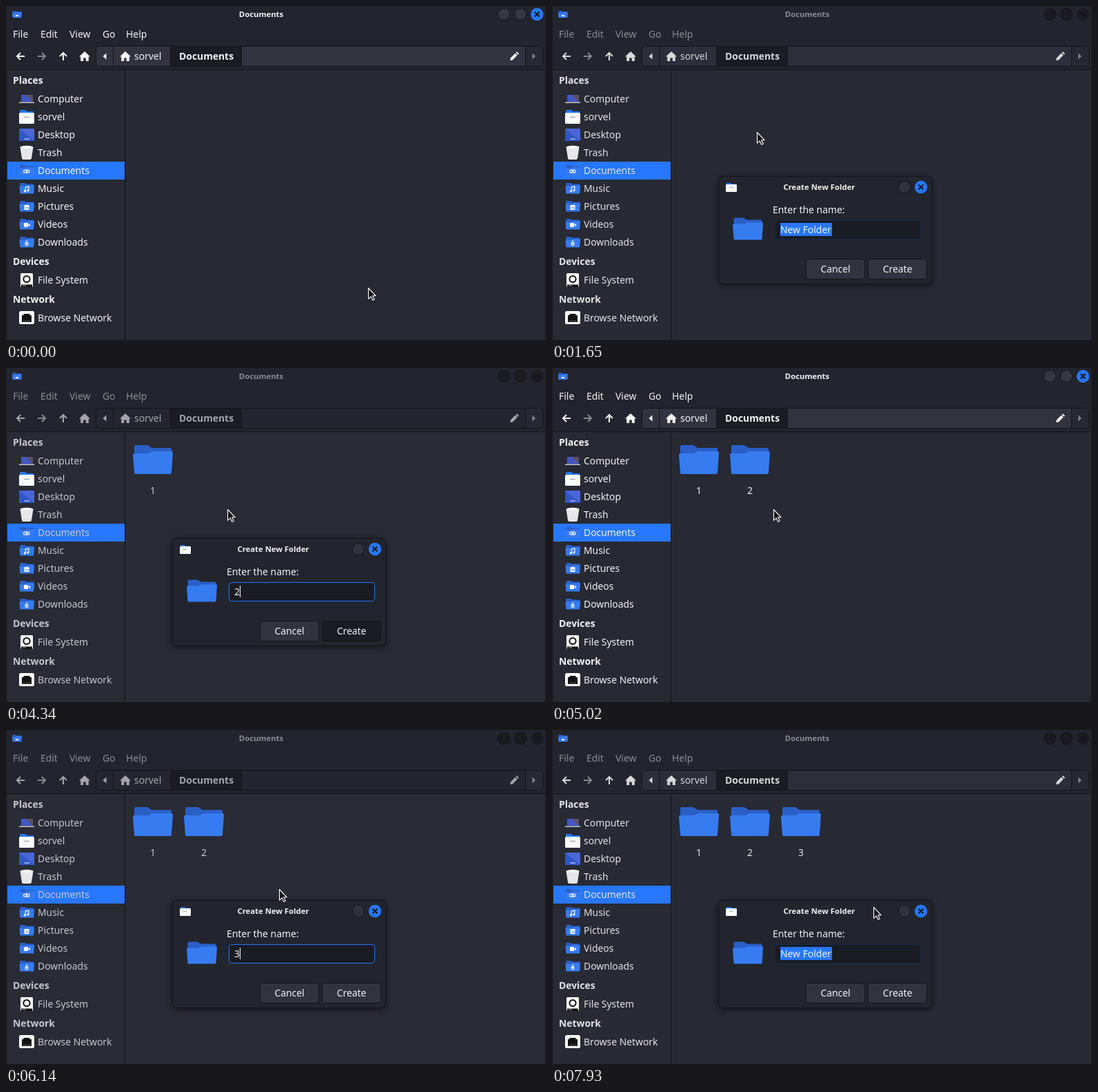
These frames come from a looping animation (783 px wide and 485 px high, 7990 ms). An HTML page:

```html
<!DOCTYPE html>
<html lang="en">
<meta charset="utf-8">
<title>Documents</title>
<style>
html, body { margin: 0; width: 100%; height: 100%; overflow: hidden; background: #23252e; }
svg {
  display: block; --k: 0; --off: 0;
  --view: color-mix(in srgb, #272933, #292b35 calc(var(--k) * 100%));
  --text: color-mix(in srgb, #f4f4f5, #c6c7cb calc(var(--k) * 100%));
  --tool: color-mix(in srgb, #f4f4f5, #a3a4a9 calc(var(--k) * 100%));
  --path: color-mix(in srgb, #31343f, #23262e calc(var(--k) * 100%));
  --head: color-mix(in srgb, #f4f4f5, #8b8c92 calc(var(--off) * 100%));
  --button: color-mix(in srgb, #353843, #1a1b21 calc(var(--off) * 100%));
  --close: color-mix(in srgb, #2777ff, #1a1b21 calc(var(--off) * 100%));
}
text { font: 13.9px "Noto Sans", sans-serif; fill: var(--text); white-space: pre; }
.bold { font-weight: 700; }
.title { font-size: 11.3px; font-weight: 700; text-anchor: middle; }
.mid { text-anchor: middle; }
.head text { fill: var(--head); }
.tool text { fill: var(--tool); }
.lit text { fill: #f2f2f3; }
.shadow { filter: drop-shadow(0 2px 5px #0008); }
</style>
<svg id="stage" width="783" height="485" viewBox="0 0 783 485"></svg>
<script>
const USER = 'sorvel', BLUE = '#2777ff', EDGE = '#131519';
const text = (x, y, s, cls = '', extra = '') => `<text x="${x}" y="${y}" class="${cls}" ${extra}>${s}</text>`;
const rect = (x, y, w, h, fill, r = 0, extra = '') =>
  `<rect x="${x}" y="${y}" width="${w}" height="${h}" rx="${r}" fill="${fill}" ${extra}/>`;
const path = (d, fill, extra = '') => `<path d="${d}" fill="${fill}" ${extra}/>`;
const line = (d, color, w = 1, extra = '') => path(d, 'none', `stroke="${color}" stroke-width="${w}" ${extra}`);
const disc = (x, y, r, fill, extra = '') => `<circle cx="${x}" cy="${y}" r="${r}" fill="${fill}" ${extra}/>`;
const group = (id, body, extra = '') => `<g id="${id}" ${extra}>${body}</g>`;
const at = (x, y, body, s = 1) => `<g transform="translate(${x} ${y}) scale(${s})">${body}</g>`;

const folder = (x, y, s = 1, front = '#367bf0', back = '#2a5fc6') => at(x, y,
  path('M2 16V2q0-2 2-2h17l6 4h27q2 0 2 2v12z', back) +
  path('M0 14q0-2 2-2h20l6-3h28q2 0 2 2l-2 29q0 2-2 2H4q-2 0-2-2z', front), s);
const house = (x, y) => path(`M${x} ${y - 7}l8 7.5h-2.2v6.5h-4v-4.5h-3.6v4.5h-4v-6.5h-2.2z`, 'var(--tool)');
const arrow = (x, y, turn, color) =>
  `<g transform="translate(${x} ${y}) rotate(${turn})">${line('M6 0H-5M0 -5L-5 0L0 5', color, 2.1)}</g>`;
const windowButton = (x, y, fill) => disc(x, y, 8.7, fill, `stroke="${EDGE}"`);
const closeButton = (x, y, fill) => disc(x, y, 9.2, fill) +
  line(`M${x - 3.5} ${y - 3.5}l7 7m0 -7l-7 7`, '#14161c', 2);

const emblems = {
  Documents: rect(25.5, 238, 5.5, 4, 'none', 2, 'stroke="#fff" stroke-width="1.1"') +
    rect(29, 238, 5, 4, 'none', 2, 'stroke="#fff" stroke-width="1.1"'),
  Music: line('M28.3 269v-6l4.5-1v6', '#fff', 1.2) + disc(27.3, 269, 1.5, '#fff') + disc(31.8, 268, 1.5, '#fff'),
  Pictures: rect(26.5, 289, 7, 7, '#fff', 1) + path('M28 294l1.8-2.5 1.4 1.5 1-.8 1 1.8z', '#5b92f2'),
  Videos: rect(26, 315, 6, 6, '#fff', 1) + path('M32 318l3-2.3v4.6z', '#fff'),
  Downloads: line('M30 340v6m-2.5 -2.5l2.5 2.5 2.5-2.5', '#fff', 1.2) + line('M27 346.5q3 3 6 0', '#fff', 1)
};

function sidebar() {
  const folders = Object.keys(emblems).map((name, i) => {
    const y = 239 + 26 * i;
    return folder(19.5, y - 8, .37) + emblems[name] + text(46, y + 5, name);
  }).join('');
  const items = [['Computer', 135], [USER, 161], ['Desktop', 187], ['Trash', 213],
    ['File System', 398], ['Browse Network', 453]].map(([s, y]) => text(46, y + 5, s)).join('');
  const heads = [['Places', 108], ['Devices', 371], ['Network', 426]].map(([s, y]) => text(10, y + 5, s, 'bold')).join('');
  return rect(2, 226, 170, 26, BLUE) + folders + items + heads +
    rect(22, 129, 17, 10, '#4257c4') + path('M29 129h10v10z', '#5a5063') + rect(19, 139.5, 22, 1.5, '#c9cad2') +
    path('M20 158v-6q0-1 1-1h7l2 2h9q1 0 1 1v4z', BLUE) + rect(19, 155, 22, 16, '#fafafa', 1.5) + line('M26 161.5h8', '#a9adb5', 1.5) +
    rect(19, 178, 22, 18, '#4a66d8', 1) + path('M19 178l22 18H20q-1 0-1-1z', '#3157c6') + line('M27 193h7', '#fff', 1.3, 'stroke-dasharray="1.5 1"') +
    path('M20.5 205h19l-2.5 16q-.3 2-2 2h-10q-1.7 0-2-2z', '#e6e7e8') + '<ellipse cx="30" cy="205" rx="9.5" ry="2.2" fill="#f7f7f7"/>' +
    rect(21, 388, 18, 20, '#fff', 1.5) + disc(30, 396.5, 4.6, '#fff', 'stroke="#111" stroke-width="2"') + rect(22, 404.5, 16, 3.5, '#111') + line('M24 406h5', '#aaa', 1) +
    rect(19, 443, 22, 19, '#fff', 2.5) + path('M23 459v-10h2.5v-2h9v2h2.5v10z', '#111') + line('M26 459v-3m2.7 3v-3m2.7 3v-3m2.7 3v-3', '#777', .8);
}

function mainWindow() {
  const menus = [['File', 10], ['Edit', 50], ['View', 92], ['Go', 140], ['Help', 174]];
  return rect(0, 0, 783, 485, '#23252e') + rect(2, 93, 779, 392, 'var(--view)') +
    rect(0, 92, 783, 1, EDGE) + rect(172, 93, 1, 392, EDGE) + rect(0, 0, 1, 485, '#191b20') + rect(782, 0, 1, 485, '#191b20') +
    folder(9, 7, .24) + line('M14 14h4', '#fff', 2) +
    group('head', text(370, 16, 'Documents', 'title') + menus.map(([s, x]) => text(x, 46, s)).join(''), 'class="head"') +
    windowButton(722, 12, 'var(--button)') + windowButton(746, 12, 'var(--button)') + closeButton(770, 12, 'var(--close)') +
    arrow(21, 73, 0, 'var(--tool)') + arrow(52, 73, 180, '#85878d') + arrow(83, 73, 90, 'var(--tool)') + house(114, 73) +
    rect(130.5, 58.5, 648, 29, 'var(--path)', 4, `stroke="${EDGE}"`) + rect(754, 59, 24, 28, '#262932', 3) +
    rect(238, 59, 104, 28, '#1a1c22') + line('M155.5 59v28M238.5 59v28M341.5 59v28M753.5 59v28', EDGE) +
    path('M145.5 68.5v9l-5-4.5z', 'var(--tool)') + path('M763 68.5v9l5-4.5z', '#7c7e85') + house(173, 73) +
    path('M731 79l.6-3.6 6.8-6.8 3 3-6.8 6.8zM739.3 67.7l1.5-1.5 3 3-1.5 1.5z', 'var(--tool)') +
    group('crumbs', text(186, 78, USER) + text(251, 78, 'Documents', 'bold'), 'class="tool"') + sidebar() +
    [1, 2, 3].map(n => group('folder' + n, folder(110 + 74 * n, 112) + text(139 + 74 * n, 183, n, 'mid'))).join('');
}

function contextMenu() {
  const W = '#f0f0f1', D = '#22252d';
  const plus = (y, d = 'M-3 0h6M0 -3v6') => at(15, y, line(d, D, 1.8));
  const square = y => rect(9, y - 6, 12, 12, W, 1.5);
  const items = [['Create Folder...', 18], ['Create Document', 45], ['Paste', 73], ['Open Terminal Here', 101],
    ['Open as Root', 128], ['Find in this folder', 155], ['Arrange Items', 183], ['Zoom In', 211],
    ['Zoom Out', 238], ['Normal Size', 265], ['Properties...', 293]];
  return rect(.5, .5, 194, 311, '#21242c', 5, `stroke="${EDGE}" class="shadow"`) +
    group('hover', rect(0, 4, 194, 27, BLUE)) +
    line('M1 59.5h193M1 87.5h193M1 169.5h193M1 197.5h193M1 279.5h193', '#1d1f26') +
    items.map(([s, y]) => text(27.3, y + 5, s, '', s == 'Paste' ? 'style="fill:#70727a"' : '')).join('') +
    path('M8 12h5l2 2h7v10H8z', W) + plus(19) +
    path('M9.5 38.5h7l4 4v9.5h-11z', W) + plus(46.5) +
    line('M9.5 68h11v12h-11zM12.5 68v-2h5v2', '#777980', 1.7) +
    rect(7, 94, 16, 13, W, 1.5) + text(8.5, 103, '$_', 'bold', `style="font-size:9px;fill:${D}"`) +
    path('M8 121.5h5l2 2h7v2.5h-14z', '#a8a9ad') + path('M8 127h14v7h-14z', W) +
    disc(13.5, 153.5, 4.5, 'none', `stroke="${W}" stroke-width="2"`) + line('M17 157l5 5', W, 2.4) +
    square(211) + plus(211) + square(238) + plus(238, 'M-3 0h6') +
    square(265) + text(15, 268.5, '1', 'bold mid', `style="font-size:9px;fill:${D}"`) +
    line('M8 287h14m-14 4h14m-14 4h14m-14 4h14', W, 2) +
    path('M178.5 40.5v9l5-4.5zM178.5 178.5v9l5-4.5z', W);
}

function dialog() {
  const button = (x, s, id) => rect(x + .5, 367.5, 85, 29, '#31343f', 4, `stroke="${EDGE}"`) +
    (id ? rect(x + .5, 367.5, 85, 29, '#1a1c22', 4, `stroke="${EDGE}" id="${id}"`) : '') + text(x + 43, 387, s, 'mid');
  return rect(241.5, 247.5, 309, 156, '#22252d', 6, `stroke="${EDGE}" class="shadow"`) +
    path('M253 262v-4q0-1 1-1h5l1.5 1.5h6.5v4z', BLUE) + rect(252, 259, 16, 11, '#fafafa', 1) + line('M257 263.5h6', '#a9adb5') +
    text(387.5, 267, 'Create New Folder', 'title') + windowButton(511, 263, '#30333d') + closeButton(535, 263, BLUE) +
    folder(262, 307.5, .76) + text(320, 301, 'Enter the name:') +
    rect(323.5, 311.5, 211, 27, '#1a1c23', 4, `stroke="${EDGE}"`) + rect(323.5, 311.5, 211, 27, 'none', 4, `stroke="${BLUE}" id="focus"`) +
    group('selection', rect(331, 315, 75, 19, BLUE) + text(331, 330, 'New Folder')) +
    group('typed', text(331, 330, '', '', 'id="name"') + rect(339, 316, 1, 17, '#fff')) +
    button(368, 'Cancel') + button(458, 'Create', 'pressed');
}

const stage = document.getElementById('stage');
stage.innerHTML = mainWindow() + group('menu', contextMenu(), 'class="lit"') + group('dialog', dialog(), 'class="lit"') +
  group('pointer', disc(1, 2, 12, '#c9c90c', 'id="click" opacity=".65"') +
    path('M.5 .5v15.8l3.7-3.5 2.5 5.4 2.5-1.1-2.5-5.3h4.5z', '#111318', 'stroke="#fff" stroke-width="1.1" stroke-linejoin="round"'));
const $ = id => document.getElementById(id);
const show = (id, on) => $(id).style.display = on ? '' : 'none';
const clamp = v => Math.max(0, Math.min(1, v));

// Times in ms.
const LOOP = 7990, STEP = 68;
const moves = [[70, 6, 262, 165], [1140, 4, 297, 183], [3260, 3, 321, 205], [5260, 5, 396, 231], [7280, 5, 466, 257]];
const clicks = [[800, 940], [1440, 1510], [2730, 2860], [3530, 3600], [5060, 5200], [5610, 5680], [6950, 7080], [7720, 7790]];
const menus = [[870, 1510, 262, 165], [2790, 3600, 297, 183], [5130, 5680, 321, 205], [7010, 7790, 396, 231]];
const dialogs = [ // open, type, press, close
  [1580, 1790, 2060, 2320], [3670, 4070, 4270, 4620], [5750, 6140, 6410, 6740], [7860, 9e3, 9e3, 9e3]];
const active = (spans, t) => spans.find(([from, to]) => t >= from && t < to);

function pointerAt(t) {
  let x = 525, y = 409;
  for (const [start, steps, toX, toY] of moves) {
    if (t < start) break;
    const p = clamp((Math.floor((t - start) / STEP) + 1) / steps), e = p * p * (3 - 2 * p);
    x += (toX - x) * e;
    y += (toY - y) * e;
  }
  return [Math.round(x), Math.round(y)];
}

function render(t) {
  const [x, y] = pointerAt(t);
  $('pointer').setAttribute('transform', `translate(${x} ${y})`);
  show('click', active(clicks, t));

  const menu = active(menus, t);
  show('menu', menu);
  if (menu) {
    const left = menu[2] + 2, top = menu[3] + 2;
    $('menu').setAttribute('transform', `translate(${left} ${top})`);
    show('hover', x >= left && y >= top + 4 && y < top + 31);
  }

  const index = dialogs.findIndex(d => t >= d[0] && t < d[3]), open = index >= 0;
  show('dialog', open);
  let dim = 0;
  for (const [from, , , to] of dialogs) dim += clamp((t - from) / 200) - clamp((t - to) / 200);
  stage.style.setProperty('--k', dim);
  stage.style.setProperty('--off', +open);
  if (open) {
    const [from, type, press] = dialogs[index];
    $('focus').setAttribute('opacity', clamp((t - from) / 200) ** 1.5);
    $('pressed').setAttribute('opacity', clamp((t - press + 40) / 80) * (t >= press));
    show('selection', t < type);
    show('typed', t >= type);
    $('name').textContent = index + 1;
  }
  for (let n = 1; n < 4; n++) show('folder' + n, t >= dialogs[n - 1][3] + 70);
}

const begin = performance.now();
function tick() {
  render((performance.now() - begin) % LOOP);
  requestAnimationFrame(tick);
}
tick();
</script>
</html>
```
